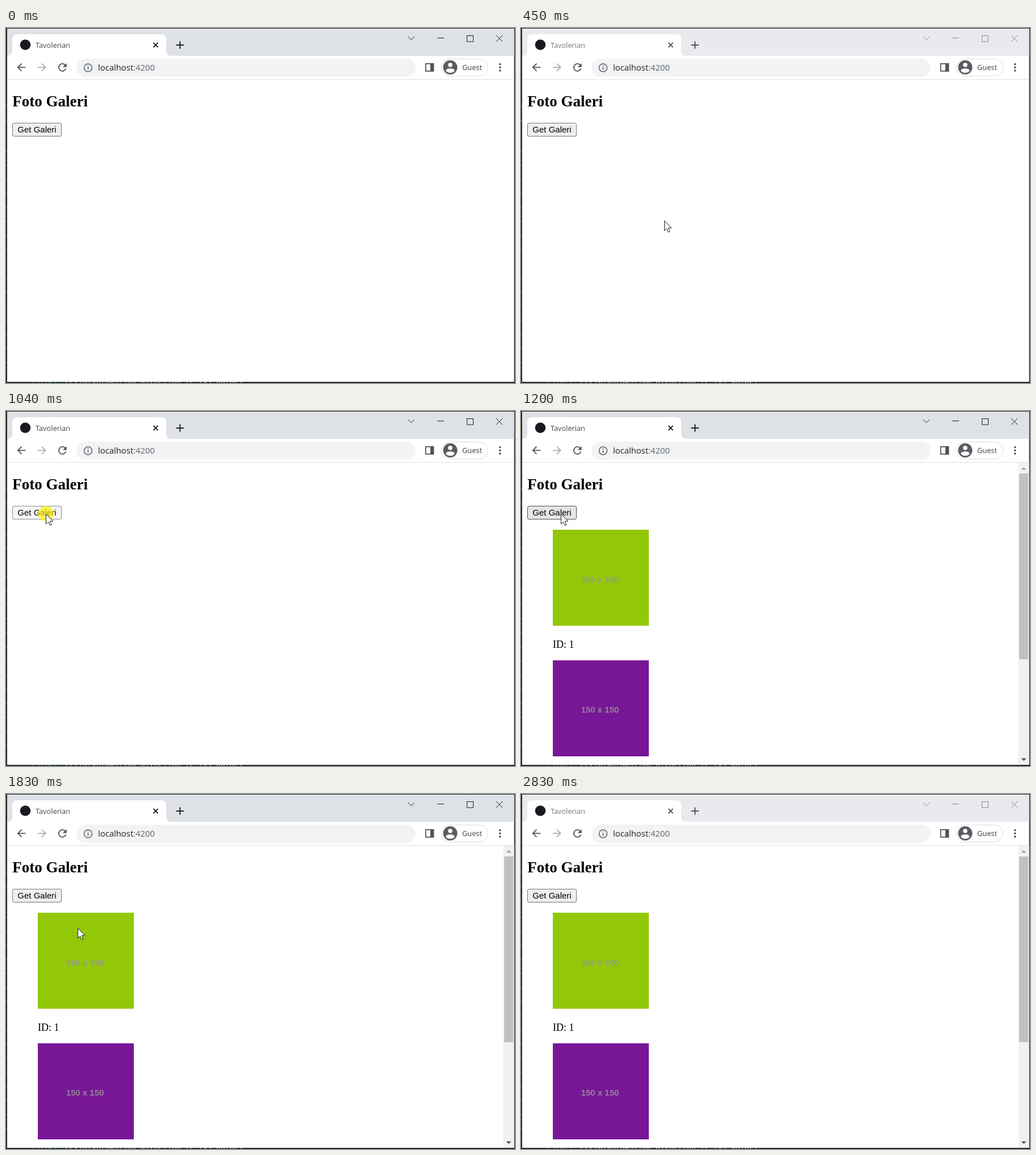
An HTML page that plays this animation: 896x625 px, repeating every 2930 ms.

```html
<!DOCTYPE html>
<html lang="en">
<head>
<meta charset="utf-8">
<title>Foto Galeri</title>
<style>
html, body { margin: 0; width: 100%; height: 100%; overflow: hidden; background: #202124; }
svg { display: block; width: 896px; height: 625px; }
text { white-space: pre; }
.ui { font-family: "Open Sans", "Noto Sans", sans-serif; }
.page { font-family: "Liberation Serif", serif; }
.sans { font-family: "Liberation Sans", sans-serif; }
.mono { font: 13px "DejaVu Sans Mono", monospace; }
.line { fill: none; stroke: currentColor; }

.bar, .caption, .tab, .button, .gallery, .click, .cursor {
  animation: 2930ms step-end infinite;
}
.bar { fill: #dee1e6; animation-name: bar; }
.caption { animation-name: caption; }
.tab { animation-name: tab; }
.button { fill: #efefef; stroke: #767676; animation-name: button; }
.gallery { visibility: hidden; animation-name: gallery; }
.click { visibility: hidden; animation-name: click; }
.cursor { visibility: hidden; animation-name: cursor; }

/* Window focus: lost at 180 ms, regained on the click, lost at 2830 ms */
@keyframes bar {
  0%, 35.495% { fill: #dee1e6; }
  6.143%, 96.587%, 100% { fill: #e8eaed; }
}
@keyframes caption {
  0%, 35.495% { opacity: 1; }
  6.143%, 96.587%, 100% { opacity: .48; }
}
@keyframes tab {
  0%, 35.495% { opacity: 1; }
  6.143%, 96.587%, 100% { opacity: .75; }
}
@keyframes button {
  0%, 58.362%, 100% { fill: #efefef; stroke: #767676; }
  28.328%, 40.956% { fill: #e5e5e5; stroke: #4f4f4f; }
  35.495% { fill: #f5f5f5; stroke: #8d8d8d; }
}
@keyframes gallery {
  0% { visibility: hidden; }
  40.956%, 100% { visibility: visible; }
}
@keyframes click {
  0%, 40.956%, 100% { visibility: hidden; }
  35.495% { visibility: visible; }
}
/* The pointer is sampled about every 54 ms */
@keyframes cursor {
  0% { visibility: hidden; transform: translate(450px, 608px); }
  6.143% { visibility: visible; transform: translate(450px, 608px); animation-timing-function: steps(5); }
  15.358% { visibility: visible; transform: translate(252px, 339px); animation-timing-function: steps(4); }
  22.867% { visibility: visible; transform: translate(112px, 216px); }
  24.573% { visibility: visible; transform: translate(97px, 204px); animation-timing-function: steps(2); }
  28.328% { visibility: visible; transform: translate(78px, 188px); animation-timing-function: steps(4); }
  35.495% { visibility: visible; transform: translate(70px, 181px); }
  58.362% { visibility: visible; transform: translate(76px, 187px); animation-timing-function: steps(2); }
  62.457% { visibility: visible; transform: translate(126px, 236px); animation-timing-function: steps(7); }
  75.08% { visibility: visible; transform: translate(520px, 661px); }
  75.085%, 100% { visibility: hidden; transform: translate(520px, 661px); }
}
</style>
</head>
<body>
<svg viewBox="0 0 896 625">
  <!-- Editor behind the window -->
  <rect width="896" height="625" fill="#242528"/>
  <path d="M.5 216V600" stroke="#8b8d90" stroke-dasharray="2 22.8"/>
  <path d="M.5 135v6M.5 160v6" stroke="#9c4a3c"/>
  <g class="mono">
    <text x="45" y="629" fill="#3f9c86">latest</text>
    <text x="104" y="629" fill="#b4b6b8">scriptAutomation directive is (42 bytes)</text>
  </g>

  <!-- Window -->
  <rect x="2" y="1" width="892.5" height="622" fill="#fff"/>
  <rect class="bar" x="2" y="1" width="892.5" height="48"/>
  <path d="M2 49Q11 49 11 40V20Q11 11 20 11H273Q282 11 282 20V40Q282 49 291 49Z" fill="#fff"/>
  <circle cx="34" cy="29.5" r="9.3" fill="#171b1f"/>
  <g class="tab ui" color="#202124">
    <text x="52" y="34.5" font-size="12.75" fill="#45494d">Tavolerian</text>
    <path class="line" d="M259.5 26l8 8m0-8l-8 8" stroke-width="1.8"/>
    <path class="line" d="M299.5 30h13.5M306.25 23.5v13" stroke-width="2"/>
  </g>
  <g class="caption line" color="#1b1c1e" stroke-width="1">
    <path d="M708 15.2l5.5 5.6 5.5-5.6M759 17.5h12M863 13l11 11m0-11l-11 11"/>
    <rect x="811.5" y="13.5" width="11" height="10.5"/>
  </g>

  <!-- Toolbar -->
  <path d="M2 90.5H894.5" stroke="#dfe1e4"/>
  <g class="line" stroke-width="1.8">
    <path color="#505357" d="M34.5 69.3H21m6.5-6.6l-6.6 6.6 6.6 6.6"/>
    <path color="#a9adb2" d="M56 69.3h13.5m-6.5-6.6l6.6 6.6-6.6 6.6"/>
    <path color="#505357" d="M104.2 65.2A6.4 6.4 0 1 0 105.4 71.4"/>
  </g>
  <path d="M106.6 62v6.8h-6.8z" fill="#505357"/>
  <rect x="124" y="54" width="597" height="32" rx="16" fill="#f1f3f4"/>
  <g color="#5f6368">
    <circle class="line" cx="144.5" cy="70" r="7" stroke-width="1.6"/>
    <path class="line" d="M144.5 69v4.6M144.5 65.7v1.7" stroke-width="1.7"/>
  </g>
  <text class="ui" x="162" y="75.3" font-size="14.83" fill="#202124">localhost<tspan fill="#5f6368">:4200</tspan></text>
  <rect x="738.8" y="62.8" width="13.6" height="13" fill="none" stroke="#505357" stroke-width="1.8"/>
  <rect x="747" y="62" width="6.2" height="14.6" fill="#505357"/>
  <rect x="766.5" y="54.5" width="82" height="30" rx="15" fill="#fff" stroke="#dadce0"/>
  <circle cx="782" cy="69.3" r="12.5" fill="#5a5e63"/>
  <circle cx="782" cy="65" r="3.8" fill="#fff"/>
  <path d="M774.3 75.4Q774.8 71.2 782 71.2T789.7 75.4Q786.9 78.8 782 78.8T774.3 75.4Z" fill="#fff"/>
  <text class="ui" x="803" y="74" font-size="12.8" fill="#3c4043">Guest</text>
  <g fill="#505357">
    <circle cx="869.7" cy="63.7" r="1.8"/>
    <circle cx="869.7" cy="69.4" r="1.8"/>
    <circle cx="869.7" cy="75.1" r="1.8"/>
  </g>

  <!-- Page -->
  <text class="page" x="11.3" y="138" font-size="27" font-weight="bold">Foto Galeri</text>
  <rect class="button" x="11.5" y="167.5" width="86" height="23" rx="2.5"/>
  <text class="sans" x="20.3" y="184" font-size="15">Get Galeri</text>

  <g class="gallery">
    <rect x="56" y="209" width="169" height="169" fill="#92c808"/>
    <rect x="56" y="439" width="169" height="169" fill="#771796"/>
    <g class="sans" font-size="15" font-weight="bold" fill="#969696" text-anchor="middle" opacity=".85">
      <text x="139" y="301.5">150 x 150</text>
      <text x="139" y="531">150 x 150</text>
    </g>
    <text class="page" x="56" y="416.5" font-size="18">ID: 1</text>
    <rect x="875.5" y="91" width="19" height="532" fill="#f1f1f1"/>
    <rect x="877" y="110" width="16" height="327" fill="#c1c1c1"/>
    <path d="M880.5 103.3l4.5-4.6 4.5 4.6z" fill="#a3a3a3"/>
    <path d="M880.5 611.5l4.5 4.6 4.5-4.6z" fill="#505050"/>
  </g>

  <!-- Pointer -->
  <circle class="click" cx="70" cy="180.5" r="13.5" fill="#fff000" fill-opacity=".68"/>
  <g class="cursor">
    <path d="M.5 .5V18L4.5 14.2 7.3 20.5 10 19.3 7.2 13.1H12.9Z" fill="#fff" stroke="#1a1a1a"/>
  </g>
</svg>
</body>
</html>
```
